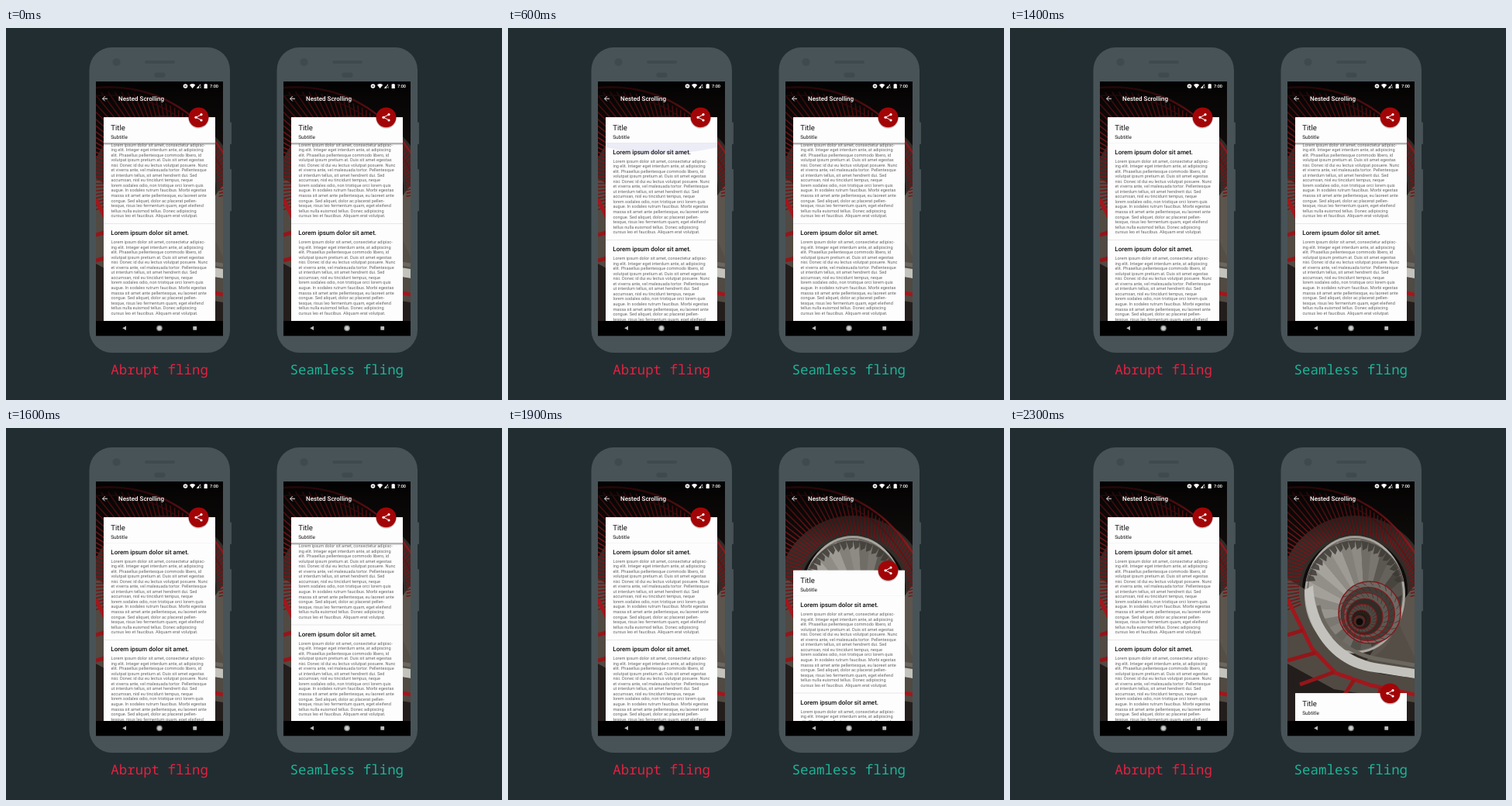
These frames come from a looping animation (640x480 px, 2.4 s). An HTML page:

```html
<!DOCTYPE html>
<html lang="en">
<head>
<meta charset="utf-8">
<title>Nested scrolling</title>
<style>
  html, body { margin: 0; width: 100%; height: 100%; overflow: hidden; background: #222d32; }
  svg { display: block; width: 640px; height: 480px; }
  text { font-family: Roboto, Arial, sans-serif; text-rendering: geometricPrecision; white-space: pre; }
  .label { font: 300 17.45px "Roboto Mono", "Noto Sans Mono", "DejaVu Sans Mono", monospace; }
  .bar { font-size: 8px; font-weight: 500; fill: #fff; }
  .clock { font-size: 5.6px; font-weight: 500; fill: #fff; }
  .title { font-size: 9.6px; fill: #111; }
  .subtitle { font-size: 6.4px; fill: #111; }
  .heading { font-size: 8px; font-weight: 500; fill: #111; }
  .body { font-size: 5.6px; fill: #666; }
</style>
</head>
<body>
<svg id="stage" viewBox="0 0 640 480" xmlns="http://www.w3.org/2000/svg"></svg>
<script>
const LOOP = 2400, STEP = 100;
const BLOCK = 125.5;      // height of one heading with its paragraph
const SCROLL = 146.5;     // initial scroll of the text
const HEADER_DROP = 227;  // travel of the card once the text is at its top

const paragraph = [
  "Lorem ipsum dolor sit amet, consectetur adipisc-",
  "ing elit. Integer eget interdum ante, at adipiscing",
  "elit. Phasellus pellentesque commodo libero, id",
  "volutpat ipsum pretium at. Duis sit amet egestas",
  "nisi. Donec id dui eu lectus volutpat posuere. Nunc",
  "et viverra ante, vel malesuada tortor. Pellentesque",
  "ut interdum tellus, sit amet hendrerit dui. Sed",
  "accumsan, nisl eu tincidunt tempus, neque",
  "lorem sodales odio, non tristique orci lorem quis",
  "augue. In sodales rutrum faucibus. Morbi egestas",
  "massa sit amet ante pellentesque, eu laoreet ante",
  "congue. Sed aliquet, dolor ac placerat pellen-",
  "tesque, risus leo fermentum quam, eget eleifend",
  "tellus nulla euismod tellus. Donec adipiscing",
  "cursus leo et faucibus. Aliquam erat volutpat."
];

const repeat = (n, draw) => Array.from({ length: n }, (_, i) => draw(i)).join("");
const text = (cls, x, y, s) => `<text class="${cls}" x="${x}" y="${y}">${s}</text>`;
const rect = (x, y, w, h, fill, r = 0) =>
  `<rect x="${x}" y="${y}" width="${w}" height="${h}" rx="${r}" fill="${fill}"/>`;
const circle = (x, y, r, attrs) => `<circle cx="${x}" cy="${y}" r="${r}" ${attrs}/>`;
const path = (d, attrs) => `<path d="${d}" ${attrs}/>`;
const polar = (cx, cy, rx, ry, deg) => {
  const a = deg * Math.PI / 180;
  return `${(cx + rx * Math.cos(a)).toFixed(1)} ${(cy + ry * Math.sin(a)).toFixed(1)}`;
};
const gray = v => `rgb(${[v, v - 3, v - 9].map(Math.round)})`;

// Stairwell seen from above, in screen coordinates (164 x 309).
function stairwell() {
  const around = (r, a) => polar(87, 140, r, r, a);
  const railRadius = a => 91 + 68 * ((327 - a) / 91) ** 2;
  const rail = offset => "M" + Array.from({ length: 50 }, (_, i) => {
    const a = 215 + i * 3;
    return around(railRadius(a) + offset, a);
  }).join("L");
  const outerPosts = repeat(66, i => {
    const a = 165 + i * 3.1;
    return `M${around(72, a)}L${around(railRadius(a), a - 5)}`;
  });
  const treads = repeat(26, i => {
    const a = i * 360 / 26;
    const light = 112 - 44 * Math.cos((a - 20) * Math.PI / 180) + (i % 2 ? 10 : -10);
    return path(`M100 168L${polar(87, 146, 61, 72, a)}L${polar(87, 146, 61, 72, a + 14.2)}Z`,
      `fill="${gray(light)}"`);
  });
  const notches = repeat(20, i => {
    const a = 190 + i * 8;
    return `M${around(64, a)}L${around(52, a + 3)}L${around(56, a + 8)}L${around(64, a + 8)}Z`;
  });
  const coil = i => {
    const k = i / 6, r = 40 - 33 * k, x = 106 - 13 * k, y = 169 + 11 * k;
    const steps = repeat(24, n => `M${polar(x, y, r, r, n * 15)}L${polar(x, y, r - 5, r - 5, n * 15 + 8)}`);
    return circle(x, y, r, `fill="${gray((i % 2 ? 72 : 108) - 50 * k)}" stroke="#84191c" stroke-width="${1.5 - .6 * k}"`)
      + path(steps, 'stroke="#4a2623" stroke-width=".7"');
  };
  return `<g transform="translate(116 69)">
    ${rect(0, 0, 164, 309, "#0f0c0b")}
    ${circle(87, 140, 82, 'fill="none" stroke="#332c28" stroke-width="28"')}
    ${path("M0 125L24 140Q40 220 120 248L164 254V309H0Z", 'fill="#504a43"')}
    ${path("M146 160Q158 140 164 135V246L100 235Z", 'fill="#5b554d"')}
    ${path("M0 235L60 268L164 285V309H0Z", 'fill="#231e1c"')}
    ${path(outerPosts, 'stroke="#761417" stroke-width="1.6" fill="none"')}
    ${path(rail(0), 'stroke="#8d171b" stroke-width="2.4" fill="none"')}
    ${path(rail(-12), 'stroke="#5e1214" stroke-width="1.2" fill="none"')}
    <ellipse cx="87" cy="146" rx="65" ry="76" fill="#aaa8a1"/>
    <ellipse cx="87" cy="146" rx="62" ry="73" fill="#67625a"/>
    ${treads}
    ${path(notches, 'fill="#3c3833" opacity=".8"')}
    ${path("M140 176Q138 215 100 232L164 243V226Z", 'fill="#544e47"')}
    ${path("M22 140C24 192 58 240 112 246L164 254V242L118 235C70 228 36 190 33 134Z", 'fill="#c3c2bc"')}
    ${path("M40 160C48 198 80 224 122 230L164 237", 'fill="none" stroke="#6b675f" stroke-width="5"')}
    ${repeat(7, coil)}
    ${circle(93, 181, 4.5, 'fill="#0d0a09"')}
    ${path("M0 152L12 176L32 216L62 247L108 263L164 275", 'fill="none" stroke="#a2171c" stroke-width="5"')}
    ${path("M0 231L36 221M16 262L60 246M60 296L86 256M112 309L120 266M150 309L148 272M0 198L20 192",
      'stroke="#93161a" stroke-width="5"')}
    ${rect(0, 0, 164, 80, "url(#shade)")}
  </g>`;
}

function statusBar() {
  return `<g fill="#fff">
    ${circle(231.5, 75, 2.8, "")}
    ${rect(230, 74.5, 3, 1, "#151515")}
    <path d="M237 73.4Q240.6 70.8 244.2 73.4L240.6 78Z"/>
    <path d="M245.6 77.8L251 72.2V74.5H249V77.8Z"/>
    <path d="M249.7 75.4L251.7 77.6M251.7 75.4L249.7 77.6" stroke="#fff" stroke-width=".6"/>
    <path d="M255.6 72.6H256.8V72H258.6V72.6H259.8V78H255.6Z"/>
  </g>${text("clock", 263, 77, "7:00")}`;
}

function toolbar() {
  return path("M131 91.2H124.7M127.7 88.1L124.6 91.2L127.7 94.3", 'fill="none" stroke="#fff" stroke-width=".9"')
    + text("bar", 145, 94.4, "Nested Scrolling");
}

function navBar() {
  return rect(116, 378, 164, 19.3, "#000")
    + path("M155 384.4V390L150.2 387.2Z", 'fill="#b9bcbd"')
    + circle(198, 387.3, 3.9, 'fill="#77797a"')
    + circle(198, 387.3, 2.6, 'fill="#c9cbcc"')
    + rect(241.3, 384.9, 4.8, 4.8, "#b9bcbd", .4);
}

function shareButton() {
  return circle(248.5, 116.4, 13.2, 'fill="#000" opacity=".22"')
    + circle(248.5, 115.3, 12.9, 'fill="#a30507"')
    + path("M252 111.8L245 115.3L252 118.8", 'fill="none" stroke="#fff" stroke-width="1"')
    + [[252, 111.6], [245, 115.3], [252, 119]].map(([x, y]) => circle(x, y, 1.6, 'fill="#fff"')).join("");
}

function block(i) {
  const y = i * BLOCK;
  return rect(126, 147.6 + y, 144, .8, "#e2e2e2")
    + text("heading", 135.3, 162.8 + y, "Lorem ipsum dolor sit amet.")
    + paragraph.map((line, n) => text("body", 135.4, 173.6 + y + n * 6.54, line)).join("");
}

function card() {
  return `<g class="card">
    ${rect(126, 115.3, 144, 270, "#fdfdfd")}
    <g clip-path="url(#textClip)"><g class="content">${repeat(4, block)}</g></g>
    <path class="glow" fill="#3f51b5"/>
    <g class="shadow">${rect(126, 148, 144, 3.6, "url(#drop)")}</g>
    ${rect(126, 115.3, 144, 33, "#fdfdfd", .8)}
    ${text("title", 135.3, 131.7, "Title")}
    ${text("subtitle", 135.3, 142.9, "Subtitle")}
    ${shareButton()}
  </g>`;
}

function phone(id, dx) {
  return `<g id="${id}" transform="translate(${dx} 0)">
    ${rect(286, 121.5, 5, 28.5, "#465054", 1.2)}
    ${rect(286, 182, 5, 54.5, "#465054", 1.2)}
    ${rect(107.5, 25, 181.5, 394, "#485357", 29)}
    ${circle(142.5, 44, 5, 'fill="#3f4a4e"')}
    ${rect(179, 42, 39, 4, "#3f4a4e", 2)}
    ${rect(191.5, 57.5, 14, 6.5, "#3f4a4e", 3.2)}
    <g clip-path="url(#screenClip)">
      ${stairwell()}${card()}${statusBar()}${toolbar()}
    </g>
    ${navBar()}
  </g>`;
}

const stage = document.getElementById("stage");
stage.innerHTML = `<defs>
    <clipPath id="screenClip"><rect x="116" y="69" width="164" height="309.5"/></clipPath>
    <clipPath id="textClip"><rect x="126" y="147.5" width="144" height="260"/></clipPath>
    <linearGradient id="shade" x2="0" y2="1">
      <stop stop-color="#000" stop-opacity=".85"/><stop offset=".3" stop-color="#000" stop-opacity=".5"/>
      <stop offset="1" stop-color="#000" stop-opacity="0"/>
    </linearGradient>
    <linearGradient id="drop" x2="0" y2="1">
      <stop stop-color="#000" stop-opacity=".48"/><stop offset="1" stop-color="#000" stop-opacity="0"/>
    </linearGradient>
  </defs>
  ${rect(0, 0, 640, 480, "#222d32")}
  ${phone("abrupt", 0)}${phone("seamless", 242)}
  <text class="label" x="135.3" y="447" fill="#e5213f">Abrupt fling</text>
  <text class="label" x="366.6" y="447" fill="#1fb497">Seamless fling</text>`;

function track(t, points) {
  const next = points.findIndex(p => p[0] > t);
  if (next === 0) return points[0][1];
  if (next < 0) return points[points.length - 1][1];
  const [t0, a] = points[next - 1], [t1, b] = points[next];
  return a + (b - a) * (t - t0) / (t1 - t0);
}

// Distance flung since the finger touched down.
const fling = t => track(t, [
  [0, 0], [100, 1.5], [200, 73], [300, 148], [400, 215],
  [500, 275], [600, 326], [700, 360], [800, SCROLL + HEADER_DROP]
]);

function pose(id, distance, carriesOn, glow) {
  const find = cls => document.querySelector(`#${id} .${cls}`);
  const scroll = Math.max(0, SCROLL - distance);
  const drop = carriesOn ? Math.max(0, distance - SCROLL) : 0;
  find("card").setAttribute("transform", `translate(0 ${drop})`);
  find("content").setAttribute("transform", `translate(0 ${-scroll})`);
  find("shadow").setAttribute("opacity", scroll > 0 ? 1 : 0);
  find("glow").setAttribute("d", `M126 148H270V${148 + glow * 60}Q198 ${148 + glow * 240} 126 ${148 + glow * 60}Z`);
  find("glow").setAttribute("opacity", glow);
}

const start = performance.now();
function draw() {
  const elapsed = (performance.now() - start) % LOOP;
  const t = Math.floor(elapsed / STEP) * STEP;
  pose("abrupt", fling(t - 200), false, track(t, [[400, 0], [500, .06], [700, .13], [900, .09], [1300, 0]]));
  pose("seamless", fling(t - 1500), true, 0);
  requestAnimationFrame(draw);
}
draw();
</script>
</body>
</html>
```
